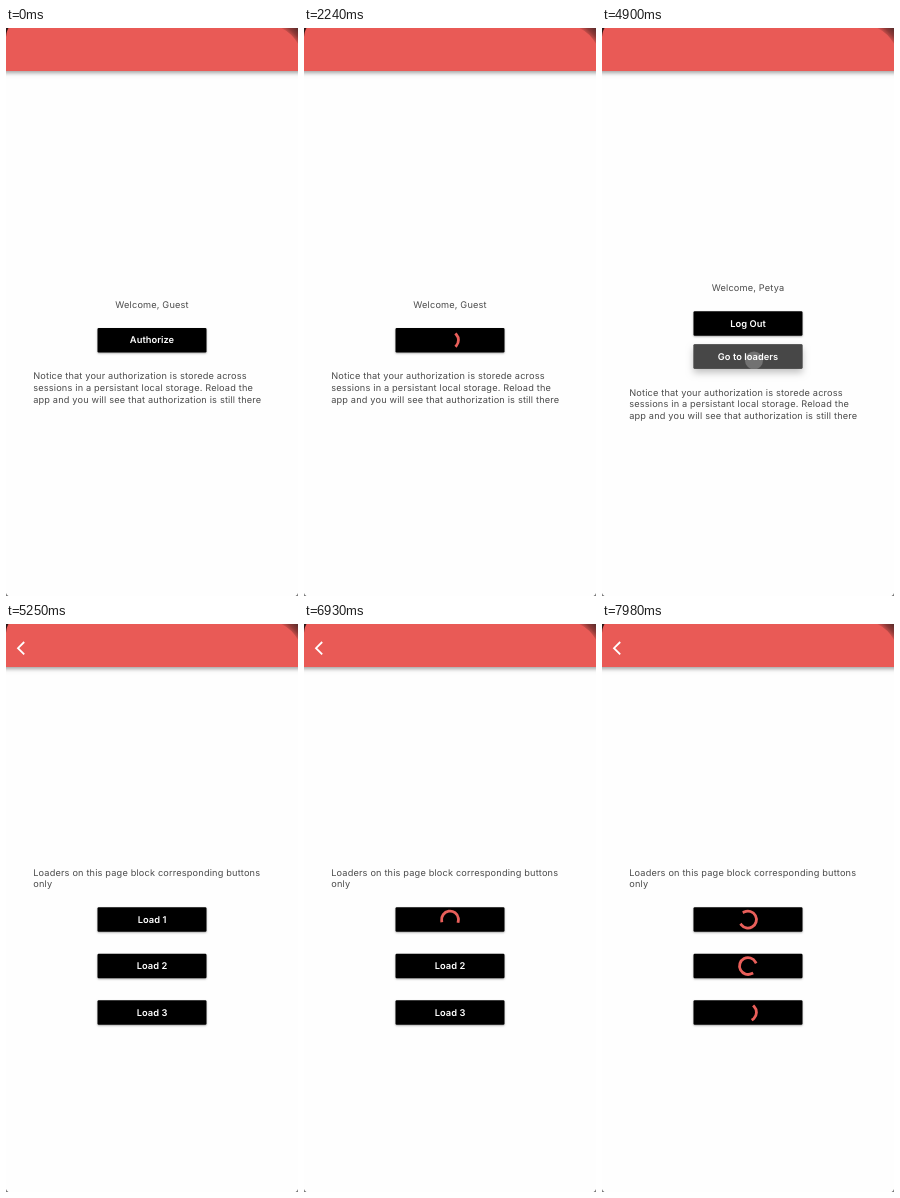
These frames come from a looping animation (292x568 px, 8 s). An HTML page with a canvas:

```html
<!DOCTYPE html>
<html lang="en">
<head>
<meta charset="utf-8">
<title>Loaders demo</title>
<style>
  html, body { margin: 0; width: 100%; height: 100%; overflow: hidden; background: #fff; }
  canvas { display: block; width: 292px; height: 568px; }
</style>
</head>
<body>
<canvas id="stage"></canvas>
<script>
const W = 292, H = 568, LOOP = 8000, STEP = 70;
const SPEED = 66.67 / 70;          // spinner time per played time
const SPIN_DELAY = 100;
const SIGNED_IN = 2310, PUSH_START = 4915, PUSH_END = 5250;
const PRESS = { authorize: 1130, go: 4830, load1: 5950, load2: 7183, load3: 7670 };
const RED = '#e95a56', ARC = '#e95f5a', TEXT = '#4b4b4b';

const canvas = document.getElementById('stage');
const ctx = canvas.getContext('2d');
const ratio = window.devicePixelRatio || 1;
canvas.width = W * ratio;
canvas.height = H * ratio;

const clamp = v => Math.min(1, Math.max(0, v));

function bezier(x1, y1, x2, y2) {
  const at = (a, b, s) => 3 * a * s * (1 - s) ** 2 + 3 * b * s * s * (1 - s) + s ** 3;
  return x => {
    let lo = 0, hi = 1;
    for (let i = 0; i < 20; i++) {
      const mid = (lo + hi) / 2;
      if (at(x1, x2, mid) < x) lo = mid; else hi = mid;
    }
    return at(y1, y2, (lo + hi) / 2);
  };
}
const fastOutSlowIn = bezier(0.4, 0, 0.2, 1);
const slideEase = bezier(0.35, 0.91, 0.33, 0.97);

function withShadow(color, blur, dy, draw) {
  ctx.save();
  ctx.shadowColor = color;
  ctx.shadowBlur = blur * ratio;
  ctx.shadowOffsetY = dy * ratio;
  draw();
  ctx.restore();
}

function text(str, x, y, { align = 'left', weight = 400, size = 9.2, spacing = 0.17, color = TEXT } = {}) {
  ctx.font = `${weight} ${size}px Inter, "Open Sans", sans-serif`;
  ctx.letterSpacing = `${spacing}px`;
  ctx.textRendering = 'geometricPrecision';
  ctx.textAlign = align;
  ctx.fillStyle = color;
  ctx.fillText(str, x, y);
}

function paragraph(lines, y) {
  lines.forEach((line, i) => text(line, 27.2, y + i * 11.6));
}

function spinner(cx, cy, ms) {
  const phase = ms / 1333 % 1;
  const head = fastOutSlowIn(clamp(phase * 2));
  const tail = fastOutSlowIn(clamp(phase * 2 - 1));
  const sweep = 1.5 * Math.PI;
  const start = -Math.PI / 2 + tail * sweep + ms / 2222 * 2 * Math.PI + phase * Math.PI / 2;
  ctx.beginPath();
  ctx.arc(cx, cy, 8.45, start, start + Math.max((head - tail) * sweep, 0.02));
  ctx.lineWidth = 2.8;
  ctx.lineCap = 'square';
  ctx.strokeStyle = ARC;
  ctx.stroke();
}

// age: time since the button was pressed, negative before that
function button(label, top, age = -1, loads = true) {
  const x = 91.5, w = 109, h = 24.5, cy = top + h / 2;
  const pressed = age >= 0;
  const glow = pressed ? clamp(age / 60) * (loads ? clamp((310 - age) / 110) : 1) : 0;
  const shape = new Path2D();
  shape.roundRect(x, top, w, h, 1.2);
  ctx.fillStyle = '#000';
  const lift = loads ? glow * clamp((220 - age) / 120) : glow;
  withShadow(`rgba(0,0,0,${0.32 - 0.08 * lift})`, 2 + 5 * lift, 1 + 3 * lift, () => ctx.fill(shape));

  if (glow > 0) {
    ctx.save();
    ctx.clip(shape);
    ctx.fillStyle = `rgba(255,255,255,${0.28 * glow})`;
    ctx.fill(shape);
    const spread = clamp((age - 70) / 130);
    ctx.fillStyle = `rgba(255,255,255,${0.23 * glow * (1 - spread)})`;
    ctx.beginPath();
    ctx.arc(152, cy + 4, 9 * clamp(age / 70) + 60 * spread, 0, 2 * Math.PI);
    ctx.fill();
    ctx.restore();
  }
  if (loads && age >= SPIN_DELAY) spinner(146, cy, (age - SPIN_DELAY) * SPEED);
  else text(label, 146, cy + 3.3, { align: 'center', weight: 600, size: 9.3, spacing: 0.05, color: '#fff' });
}

function homePage(t) {
  const signedIn = t >= SIGNED_IN;
  const dy = signedIn ? 16.4 : 0;
  text(`Welcome, ${signedIn ? 'Petya' : 'Guest'}`, 146, 279.6 - dy, { align: 'center' });
  if (signedIn) {
    button('Log Out', 283.3);
    button('Go to loaders', 316.2, t - PRESS.go, false);
  } else {
    button('Authorize', 299.9, t - PRESS.authorize);
  }
  paragraph([
    'Notice that your authorization is storede across',
    'sessions in a persistant local storage. Reload the',
    'app and you will see that authorization is still there'
  ], 351.3 + dy);
}

function loadersPage(t) {
  paragraph(['Loaders on this page block corresponding buttons', 'only'], 251.6);
  button('Load 1', 283.3, t - PRESS.load1);
  button('Load 2', 329.8, t - PRESS.load2);
  button('Load 3', 376.2, t - PRESS.load3);
}

function appBar() {
  ctx.fillStyle = RED;
  withShadow('rgba(0,0,0,0.36)', 4, 1.5, () => ctx.fillRect(-10, -10, W + 20, 53));
}

function chevron() {
  ctx.beginPath();
  ctx.moveTo(18.2, 18);
  ctx.lineTo(12, 24.2);
  ctx.lineTo(18.2, 30.4);
  ctx.lineWidth = 1.8;
  ctx.lineCap = 'butt';
  ctx.strokeStyle = '#fff';
  ctx.stroke();
}

function corner(points, color) {
  ctx.beginPath();
  ctx.moveTo(points[0], points[1]);
  ctx.quadraticCurveTo(points[2], points[3], points[4], points[5]);
  ctx.lineTo(points[6], points[7]);
  ctx.fillStyle = color;
  ctx.fill();
}

function screenCorners() {
  corner([0, 9, 0.5, 3, 2.5, 0, 0, 0], '#2a1514');
  const shade = ctx.createLinearGradient(283, 9, 292, 0);
  shade.addColorStop(0, 'rgba(70,30,30,0)');
  shade.addColorStop(0.5, 'rgba(70,30,30,0.55)');
  shade.addColorStop(1, 'rgba(60,35,35,0.85)');
  corner([275, 0, 286, 5, W, 16, W, 0], shade);
  corner([0, 565, 0.5, 567, 2.5, H, 0, H], '#777');
  corner([W, 565, 291.5, 567, 289.5, H, W, H], '#777');
}

function shifted(dx, draw) {
  ctx.save();
  ctx.translate(dx, 0);
  draw();
  ctx.restore();
}

function render(t) {
  ctx.setTransform(ratio, 0, 0, ratio, 0, 0);
  ctx.fillStyle = '#fefefe';
  ctx.fillRect(0, 0, W, H);
  const push = t >= PUSH_END ? 1 : slideEase(clamp((t - PUSH_START) / (PUSH_END - PUSH_START)));
  const left = W * (1 - push);
  if (push < 1) shifted(-push * W / 3, () => homePage(t));
  if (push > 0) shifted(left, () => {
    ctx.fillStyle = '#fefefe';
    ctx.fillRect(0, 0, W, H);
    loadersPage(t);
  });
  appBar();
  if (push > 0) shifted(left, chevron);
  screenCorners();
}

function tick() {
  const t = performance.now() % LOOP;
  render(Math.floor(t / STEP) * STEP);
  requestAnimationFrame(tick);
}
tick();
</script>
</body>
</html>
```
